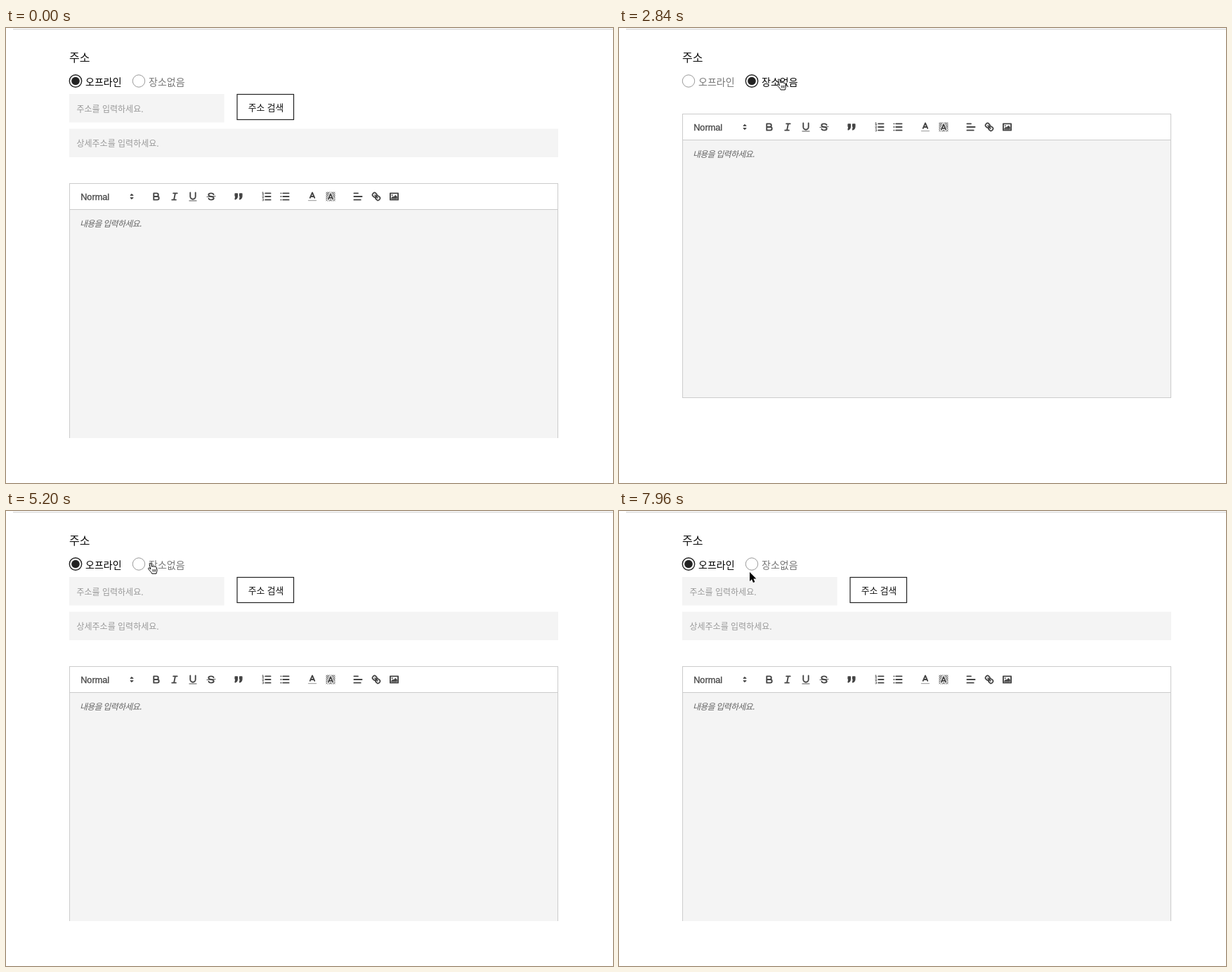
An HTML page for the animation above (8000 ms loop, 864 by 648 pixels).

```html
<!DOCTYPE html>
<html lang="ko">
<head>
<meta charset="utf-8">
<title>주소 입력</title>
<style>
html, body { margin: 0; width: 100%; height: 100%; overflow: hidden; background: #fff; }
svg { display: block; }
text { font-family: 'Noto Sans CJK KR', 'Noto Sans CJK', sans-serif; fill: #111; }
.label { font-size: 14px; fill: #777; }
.on .label { fill: #000; }
.ring { fill: #fff; stroke: #999; }
.on .ring { stroke: #222; stroke-width: 1.4; }
.dot { fill: #222; visibility: hidden; }
.on .dot { visibility: visible; }
.field { fill: #f4f4f4; }
.hint { font-size: 12px; fill: #999; }
.note { font-size: 12px; font-style: italic; letter-spacing: -.78px; fill: #666; }
.size { font: 12.7px 'Liberation Sans', Arial, sans-serif; fill: #444; stroke: #444; stroke-width: .3; }
.icon { fill: none; stroke: #444; stroke-width: 2; stroke-linecap: round; stroke-linejoin: round; }
.icon .thin { stroke-width: 1; }
.icon .solid { fill: #444; }
.icon .pale { stroke: #aaa; stroke-width: 1.4; }
.icon .halo { stroke: #fff; stroke-width: 4; }
</style>
</head>
<body>
<svg width="864" height="648" viewBox="0 0 864 648">
  <defs>
    <clipPath id="view"><rect width="864" height="584"/></clipPath>
    <pattern id="hatch" width="2" height="2" patternUnits="userSpaceOnUse" patternTransform="rotate(45)">
      <rect width="1" height="2" fill="#444"/>
    </pattern>
  </defs>
  <rect x="10" y="1" width="854" height="1.5" fill="#ddd"/>
  <text x="90" y="48" font-size="16">주소</text>
  <g id="offline">
    <circle class="ring" cx="99" cy="75.5" r="8.7"/><circle class="dot" cx="99" cy="75.5" r="5.8"/>
    <text class="label" x="113" y="82">오프라인</text>
  </g>
  <g id="nowhere">
    <circle class="ring" cx="189" cy="75.5" r="8.7"/><circle class="dot" cx="189" cy="75.5" r="5.8"/>
    <text class="label" x="203" y="82">장소없음</text>
  </g>
  <g id="address">
    <rect class="field" x="90" y="94" width="220.5" height="40.5"/>
    <text class="hint" x="100.5" y="119.5">주소를 입력하세요.</text>
    <rect x="329" y="94.5" width="80.5" height="36" fill="#fff" stroke="#222" stroke-width="1.2"/>
    <text x="344.7" y="117.6" font-size="12.8">주소 검색</text>
    <rect class="field" x="90" y="143.5" width="696" height="40.5"/>
    <text class="hint" x="100.5" y="169">상세주소를 입력하세요.</text>
  </g>
  <g clip-path="url(#view)">
    <g id="editor">
      <rect x="90.5" y="122.5" width="695" height="404" fill="#fff" stroke="#ccc"/>
      <rect class="field" x="91" y="160" width="694" height="366"/>
      <path d="M91 159.5H785" stroke="#ccc"/>
      <text class="size" x="106.2" y="145.6">Normal</text>
      <text class="note" x="105" y="183.5">내용을 입력하세요.</text>
      <g id="tools"></g>
    </g>
  </g>
  <g id="cursor">
    <path id="arrow" d="M0 0V13L3 10.3L5 15L7.4 14L5.4 9.4H9.4Z" fill="#000" stroke="#fff" stroke-width="1" paint-order="stroke"/>
    <g id="hand" transform="translate(-4 -.5)" stroke="#000" stroke-linejoin="round" stroke-linecap="round">
      <path fill="#fff" d="M4.2 9.6L2.6 2.3C2.3 .6 4.4 .2 4.9 1.8L6.2 6.2C6.4 4.9 8.2 5 8.4 6.2C8.8 5.2 10.3 5.3 10.6 6.6C11.2 5.8 12.6 6.2 12.8 7.5L13.4 11C13.6 13 12.6 14 12.4 16H6.2C5.6 14 3.2 12.4 1.2 9.4C.4 8 2 7.2 3 8.2Z"/>
      <path d="M7.2 10.2L7.5 13M9.2 10.2L9.4 13M11.1 10.2L11.2 13" stroke-width=".8"/>
    </g>
    <path id="beam" d="M-3 -7.5Q0 -7.5 0 -5.5Q0 -7.5 3 -7.5M0 -5.5V5.5M-3 7.5Q0 7.5 0 5.5Q0 7.5 3 7.5M-1.5 2H1.5" fill="none" stroke="#333"/>
  </g>
</svg>
<script>
const $ = id => document.getElementById(id);
const path = (d, cls = '') => `<path class="${cls}" d="${d}"/>`;
const rows = x => `M${x} 4H15M${x} 9H15M${x} 14H15`;
const letter = (y, cls) => path(`M5.5 ${y + 8}L9 ${y}L12.5 ${y + 8}M6.4 ${y + 6}H11.6`, cls);

// Toolbar icons on an 18-unit grid, keyed by their centre x
const icons = [
  [179, path('M7 11L9 13L11 11ZM7 7L9 5L11 7Z', 'solid thin')],
  [214, path('M5 4H9.5A2.5 2.5 0 0 1 9.5 9H5ZM5 9H10.5A2.5 2.5 0 0 1 10.5 14H5Z')],
  [240, path('M7 4H13M5 14H11M8 14L10 4')],
  [266, path('M5 3V9A4 4 0 0 0 13 9V3') + path('M3.5 15.5H14.5', 'thin')],
  [292, path('M12.9 6C12.4 4.8 10.9 4 9 4C6.7 4 5 5.1 5 6.5C5 8 6.3 8.6 9 9C11.7 9.4 13 10 13 11.5C13 12.9 11.3 14 9 14C7.1 14 5.6 13.2 5.1 12') +
        path('M2.5 9.5L15.5 8.5', 'thin')],
  [331, path('M4 5H7V8H4ZM11 5H14V8H11ZM7 8C7 12 4 13 4 13L5 8ZM14 8C14 12 11 13 11 13L12 8Z', 'solid')],
  [371, path(rows(7)) + path('M2.5 2.7L3.5 2.3V5.5M2.5 5.5H4.5M2.5 8.2C2.8 7 4.4 7.2 4.3 8.4C4.2 9.3 2.5 10 2.5 10.5H4.5M2.5 13.1C2.9 12 4.3 12.3 4.3 13.2Q4.3 14 3.7 14Q4.4 14.1 4.3 14.8C4.2 15.8 2.8 15.8 2.5 14.9', 'thin')],
  [397, path(rows(6) + 'M3 4h.01M3 9h.01M3 14h.01')],
  [436, path('M3 15H15', 'pale') + letter(3)],
  [462, '<rect x="2" y="2" width="14" height="14" fill="url(#hatch)" stroke="none"/>' + letter(5, 'halo') + letter(5)],
  [501, path('M3 9H15M3 14H13M3 4H9')],
  [527, path('M7 7L11 11M8.9 4.6A3.5 3.5 0 0 1 9.3 9.3A3.5 3.5 0 0 1 4.6 8.9C3.2 7.5 2 6.4 4.2 4.2S7.5 3.2 8.9 4.6ZM13.4 9.1A3.5 3.5 0 0 0 8.7 8.7A3.5 3.5 0 0 0 9.1 13.4C10.5 14.8 11.6 16 13.8 13.8S14.8 10.5 13.4 9.1Z')],
  [552.5, path('M3 4H15V14H3Z') + path('M5 12V11L7 9L8 10L11 7L13 9V12Z', 'solid thin') + '<circle class="solid" cx="6" cy="7" r="1" stroke="none"/>']
];
$('tools').innerHTML = icons.map(([x, art]) =>
  `<g class="icon" transform="translate(${x} 141) scale(.928) translate(-9 -9)">${art}</g>`).join('');

const LOOP = 8000, STEP = 40, ENTER = 880;
const SWITCHES = [2360, 3800, 5720, 7160];
const start = [693, 529];
const out = p => 1 - (1 - p) ** 2.2;
const both = p => p * p * (3 - 2 * p);
// from, to, x, y, easing
const moves = [
  [880, 1640, 268, 68, out],
  [1640, 2240, 228, 72.5, both],
  [3080, 3560, 128, 72.5, both],
  [4720, 5400, 226, 74, both],
  [6160, 6840, 143, 76, both],
  [7800, 7960, 186, 87, both]
];

function pointAt(t) {
  let [x, y] = start;
  for (const [from, to, nx, ny, ease] of moves) {
    const k = ease(Math.min(1, Math.max(0, (t - from) / (to - from))));
    x += (nx - x) * k;
    y += (ny - y) * k;
  }
  return [x, y];
}

function cursorKind(x, y, offline) {
  const inside = (l, t, r, b) => x >= l && x <= r && y >= t && y <= b;
  if (inside(90, 65, 166, 86) || inside(180, 65, 256, 86)) return 'hand';
  const top = offline ? 259 : 160;
  if (inside(90, top, 786, 584)) return 'beam';
  if (offline && (inside(90, 94, 310, 134) || inside(90, 143, 786, 184))) return 'beam';
  return 'arrow';
}

const show = (id, on) => { $(id).style.display = on ? '' : 'none'; };

function draw(ms) {
  const t = Math.floor(ms % LOOP / STEP) * STEP;
  const offline = SWITCHES.filter(s => t >= s).length % 2 === 0;
  $('offline').setAttribute('class', offline ? 'on' : '');
  $('nowhere').setAttribute('class', offline ? '' : 'on');
  show('address', offline);
  $('editor').setAttribute('transform', `translate(0 ${offline ? 99 : 0})`);

  const [x, y] = pointAt(t), kind = cursorKind(x, y, offline);
  show('cursor', t >= ENTER);
  $('cursor').setAttribute('transform', `translate(${x} ${y})`);
  for (const id of ['arrow', 'hand', 'beam']) show(id, id === kind);
}

const began = performance.now();
function tick() {
  draw(performance.now() - began);
  requestAnimationFrame(tick);
}
tick();
</script>
</body>
</html>
```
